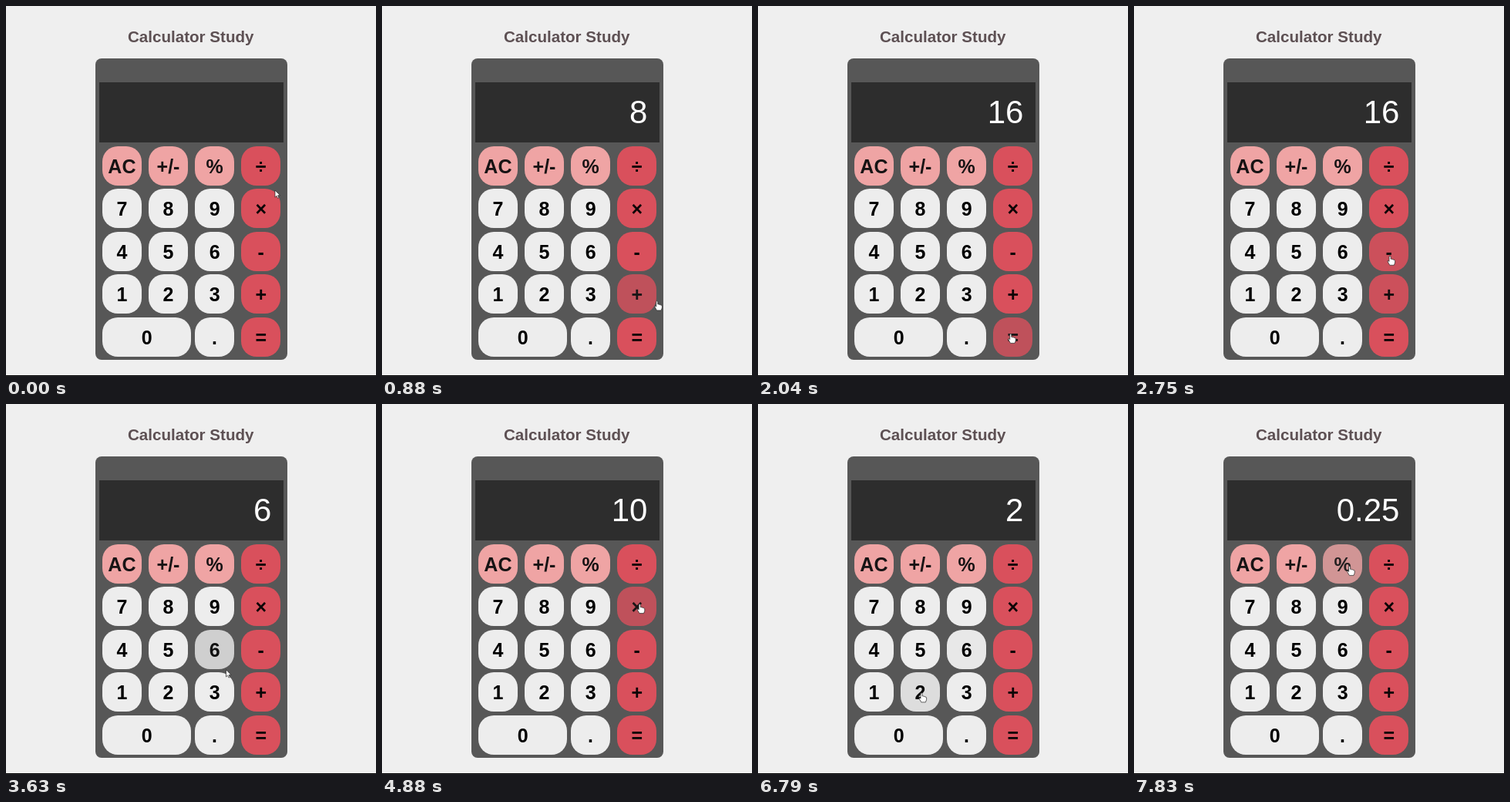
Animation of 480 by 480 pixels, one loop 8000 ms. Source, as an HTML page:

```html
<!DOCTYPE html>
<html lang="en">
<head>
<meta charset="utf-8">
<title>Calculator Study</title>
<style>
  html, body { margin: 0; width: 100%; height: 100%; overflow: hidden; background: #efefef; }
  body { position: relative; font-family: "Liberation Sans", Arial, sans-serif; }
  h1, .body, .screen, .key, .pointer, .edge { position: absolute; margin: 0; box-sizing: border-box; }
  h1 { left: 0; width: 479.5px; top: 28px; line-height: 24px; text-align: center; font-size: 20.6px; color: #5d5053; }
  .body { left: 115.7px; top: 68.3px; width: 249.2px; height: 390.6px; border-radius: 8px; background: #575757; }
  .screen { left: 120.8px; top: 99.2px; width: 239px; height: 78px; padding-right: 15.4px;
    background: #2d2d2d; color: #fff; font-size: 42px; line-height: 78px; text-align: right; }
  .key { height: 51.2px; line-height: 52.4px; border-radius: 20px; text-align: center;
    font-size: 25px; font-weight: bold; background: #ededed; color: #000; }
  .key.fn { background: #efa4a4; color: #171314; }
  .key.op { background: #d9505c; color: #0c0506; }
  .edge { left: 0; bottom: 0; width: 100%; height: 1px; background: #000; }
  .pointer { left: 0; top: 0; overflow: visible; }
  .pointer path { fill: #fff; stroke: #222; stroke-width: .7px; }
</style>
</head>
<body>
<h1>Calculator Study</h1>
<div class="body"></div>
<div class="screen" id="screen"></div>
<div id="keys"></div>
<div class="edge"></div>
<svg class="pointer" id="pointer" width="12" height="14">
  <path id="arrow" d="M0 0V9.2L2.1 7.3L3.5 10.4L5 9.7L3.7 6.7H6.6Z"/>
  <path id="hand" d="M-1 .9Q0-.6 1.1 .9V4.2Q2.3 3.6 2.9 4.7Q4.2 4.2 4.8 5.2Q6.3 5 6.6 6.4V9L5.4 12.2H-.2L-2.7 7.9Q-3.4 6.2-2 6.3L-1 7.4Z"/>
</svg>
<script>
const LOOP = 8000, FADE = 200, SAMPLES = 25, HOLD = 90;
const SIZE = 51.2, RADIUS = 20;

const layout = ["AC +/- % ÷", "7 8 9 ×", "4 5 6 -", "1 2 3 +", "0 . ="];

// Keys pressed in each burst, its time span, and how far the first move swings right
const bursts = [
  { keys: "8+", from: 0, to: 900 },
  { keys: "8=", from: 900, to: 2040 },
  { keys: "-6=", from: 2330, to: 4050 },
  { keys: "×5=", from: 4050, to: 5650, swing: 78 },
  { keys: "÷2=", from: 5650, to: 7250, swing: 88 },
  { keys: "%", from: 7460, to: 7800 }
];

// Where the pointer rests, relative to the key's centre
const rest = { "+": [26, 9], "×": [7, -5], "%": [9, 3], "=": [-3, -4] };

const byId = id => document.getElementById(id);
const [screen, pointer, arrow, hand] = ["screen", "pointer", "arrow", "hand"].map(byId);
const smooth = s => s * s * (3 - 2 * s);

const keys = layout.flatMap((line, r) => line.split(" ").map((label, i, row) => {
  const col = row.length === 3 && i ? i + 1 : i;
  const key = { label, x: 124.8 + col * 60.1, y: 181.6 + r * 55.5, w: label === "0" ? 115.6 : SIZE };
  key.el = document.createElement("div");
  key.el.className = "key " + (col === 3 ? "op" : r === 0 ? "fn" : "");
  key.el.textContent = label;
  key.el.style.cssText = `left:${key.x}px;top:${key.y}px;width:${key.w}px`;
  byId("keys").append(key.el);
  return key;
}));

const operators = {
  "+": (a, b) => a + b, "-": (a, b) => a - b,
  "×": (a, b) => a * b, "÷": (a, b) => a / b
};

function createCalculator() {
  let shown = "", left = 0, operator = "", fresh = true;
  return label => {
    if (/\d/.test(label)) {
      shown = fresh ? label : shown + label;
    } else if (operators[label]) {
      left = +shown;
      operator = label;
    } else {
      shown = String(label === "%" ? shown / 100 : operators[operator](left, +shown));
    }
    fresh = !/\d/.test(label);
    return shown;
  };
}

function restPoint(label) {
  const key = keys.find(k => k.label === label);
  const [dx, dy] = rest[label] || [1.5, 1];
  return [key.x + key.w / 2 + dx, key.y + SIZE / 2 + dy];
}

// A swinging move takes twice the time of a direct one
function planMoves() {
  const press = createCalculator();
  const moves = [];
  let here = [349, 239];
  for (const { keys: labels, from, to, swing = 0 } of bursts) {
    const unit = (to - from) / (labels.length + (swing ? 1 : 0));
    let time = from;
    [...labels].forEach((label, i) => {
      const bow = i ? 0 : swing;
      const next = time + unit * (bow ? 2 : 1);
      const target = restPoint(label);
      moves.push({ start: time, end: next - HOLD, a: here, b: target, bow, reading: press(label) });
      here = target;
      time = next;
    });
  }
  return moves;
}

const moves = planMoves();

function pointerAt(t) {
  const { start, end, a, b, bow } = moves.findLast(m => m.start <= t);
  const s = smooth(Math.min(1, (t - start) / (end - start)));
  return [
    a[0] + (b[0] - a[0]) * s + bow * Math.sin(Math.PI * s),
    a[1] + (b[1] - a[1]) * s
  ];
}

// Rounded-rectangle test with a pixel of slack
function isOver(key, [x, y]) {
  const outside = (p, from, length) => Math.max(0, Math.abs(p - from - length / 2) - length / 2 + RADIUS);
  return Math.hypot(outside(x, key.x, key.w), outside(y, key.y, SIZE)) <= RADIUS + 1;
}

function render(t) {
  const at = pointerAt(t);
  const trail = Array.from({ length: SAMPLES }, (_, i) => pointerAt(Math.max(0, t - i * FADE / SAMPLES)));
  for (const key of keys) {
    const share = trail.filter(p => isOver(key, p)).length / SAMPLES;
    key.el.style.opacity = 1 - .2 * smooth(share);
  }
  const pointing = keys.some(k => isOver(k, at));
  hand.style.display = pointing ? "" : "none";
  arrow.style.display = pointing ? "none" : "";
  pointer.style.transform = `translate(${at[0]}px,${at[1]}px)`;
  screen.textContent = moves.findLast(m => m.end <= t)?.reading ?? "";
}

const start = performance.now();
function tick() {
  render((performance.now() - start) % LOOP);
  requestAnimationFrame(tick);
}
tick();
</script>
</body>
</html>
```
